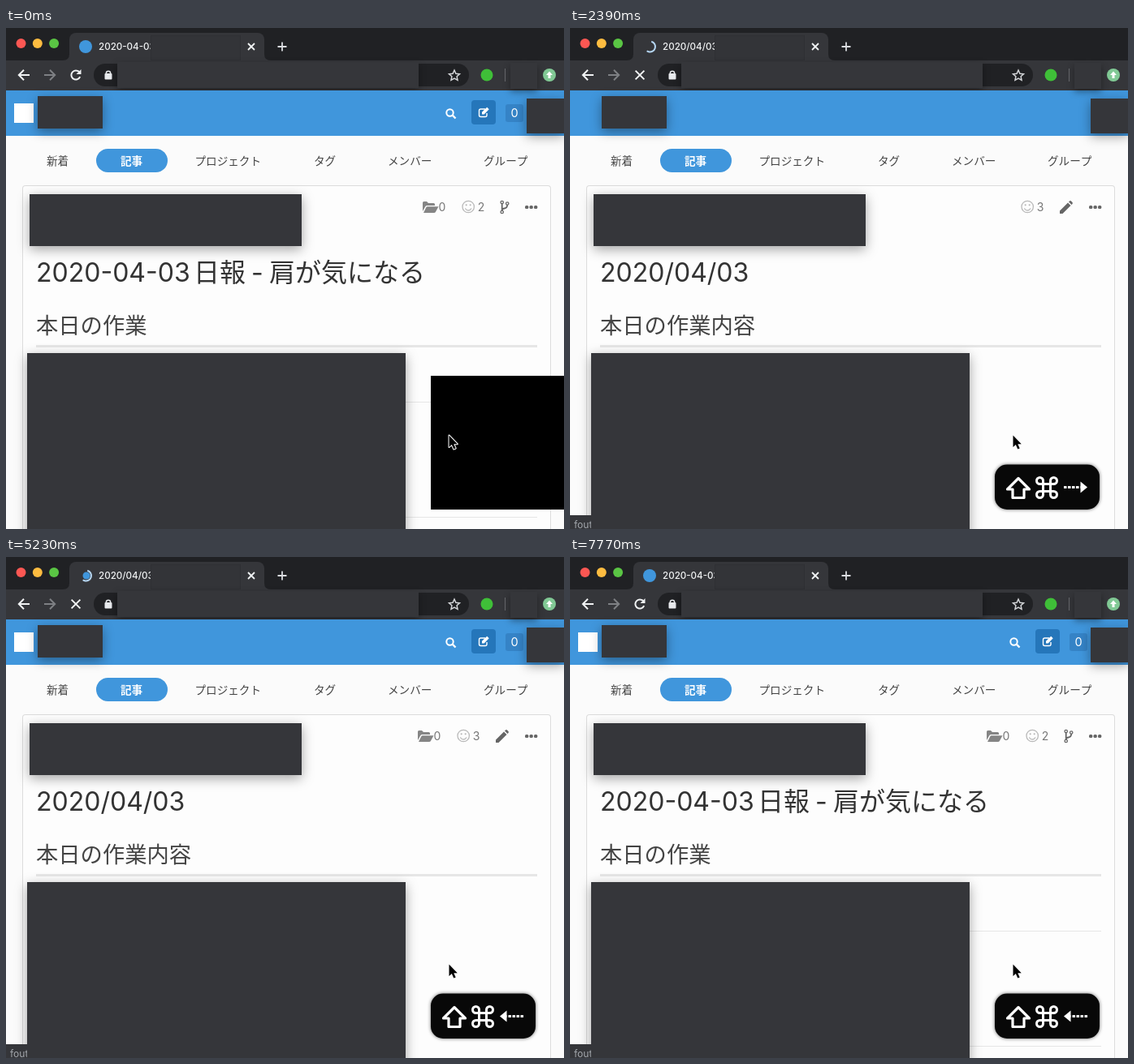
An HTML page with a canvas that plays this animation: 687x618 px, repeating every 8 s.

```html
<!DOCTYPE html>
<html lang="ja">
<head>
<meta charset="utf-8">
<title>日報</title>
<style>
html, body { margin: 0; width: 100%; height: 100%; overflow: hidden; background: #fcfcfc; }
canvas { display: block; }
</style>
</head>
<body>
<canvas id="stage" width="687" height="618"></canvas>
<script>
const ctx = document.getElementById('stage').getContext('2d');
const LOOP = 8000;
const FONT = 'Inter, "Noto Sans CJK JP", "Noto Sans CJK", sans-serif';
const BLUE = '#4096dc', DARK = '#202124', GREY = '#35363a';

const pages = {
  hyphen: { tab: '2020-04-03', title: [[37, '2020-04-03'], [231, '日報'], [302, '-'], [324, '肩が気になる']],
    heading: '本日の作業', likes: 2, shift: 0, rules: [461, 603], tool: 'fork' },
  slash: { tab: '2020/04/03', title: [[37, '2020/04/03'], [225, '日報']],
    heading: '2020/04/03', likes: 1, shift: 2, rules: [461], tool: 'fork' },
  plain: { tab: '2020/04/03', title: [[37, '2020/04/03']],
    heading: '本日の作業内容', likes: 3, shift: -6, rules: [], tool: 'pencil' }
};

// Each visit: request, new page, header ready, spinner off, status fading, status gone
const visits = [
  { at: -9000, shown: -1, ready: -1, done: -1, fade: -1, gone: -1, page: pages.hyphen },
  { at: 150, shown: 450, ready: 600, done: 740, fade: 1340, gone: 1490, page: pages.slash },
  { at: 2090, shown: 2390, ready: 2540, done: 2690, fade: 2980, gone: 3130, page: pages.plain },
  { at: 4930, shown: 5370, ready: 5520, done: 5670, fade: 5820, gone: 5970, page: pages.slash },
  { at: 7320, shown: 7620, ready: 7770, done: 7770, fade: LOOP, gone: LOOP, page: pages.hyphen }
];

// Key overlay: shown, fading, gone, direction
const presses = [[150, 4180, 4330, 1], [4930, 7020, 7170, -1], [7320, LOOP, LOOP, -1]];

const shapes = {
  back: new Path2D('M7 0H-6M0-6.2L-6.2 0L0 6.2'),
  cross: new Path2D('M-4-4L4 4M4-4L-4 4'),
  plus: new Path2D('M-5.5 0H5.5M0-5.5V5.5'),
  up: new Path2D('M0-4.5L4 0H1.5V4H-1.5V0H-4Z'),
  star: new Path2D('M0-6.5L1.9-2.3L6.5-1.8L3.1 1.3L4 5.8L0 3.5L-4 5.8L-3.1 1.3L-6.5-1.8L-1.9-2.3Z'),
  edit: new Path2D('M2-4H-3.5Q-5.5-4-5.5-2V3.5Q-5.5 5.5-3.5 5.5H2Q4 5.5 4 3.5V1'),
  pen: new Path2D('M-2 2.5V-.2L4.2-6.2L6.7-3.7L.7 2.5Z'),
  folder: new Path2D('M0 13V2.5Q0 1 1.5 1H5L7 3H13.5Q15 3 15 4.5V6H5.5Q4 6 3.3 7.3Z' +
    'M1 15L4.3 8.3Q4.8 7.2 6 7.2H19.5L16 13.8Q15.3 15 14 15Z'),
  pencil: new Path2D('M0 12.5L10 2.5L13.5 6L3.5 16H0Z' +
    'M11 1.5L12 .5Q13-.3 14 .5L15.5 2Q16.3 3 15.5 4L14.5 5Z'),
  fork: new Path2D('M0-4V4M6.5-3Q6.5 1 3 1.5Q0 2 0 4'),
  shift: new Path2D('M0-12.5L13.5 1H7V11.5H-7V1H-13.5Z'),
  command: new Path2D('M4.5 8.5V-8.5A4 4 0 1 1 8.5-4.5H-8.5A4 4 0 1 1-4.5-8.5V8.5' +
    'A4 4 0 1 1-8.5 4.5H8.5A4 4 0 1 1 4.5 8.5Z'),
  arrowHead: new Path2D('M14.5 0L6-7V7Z'),
  cursor: new Path2D('M0 0V14.5L3.3 11.5L5.8 17L8.2 16L5.8 10.7H10.3Z')
};

function rect(x, y, w, h, color, r = 0) {
  ctx.fillStyle = color;
  ctx.beginPath();
  ctx.roundRect(x, y, w, h, r);
  ctx.fill();
}

function dot(x, y, r, color) {
  ctx.fillStyle = color;
  ctx.beginPath();
  ctx.arc(x, y, r, 0, Math.PI * 2);
  ctx.fill();
}

function arc(x, y, r, from, to, color, width) {
  ctx.strokeStyle = color;
  ctx.lineWidth = width;
  ctx.beginPath();
  ctx.arc(x, y, r, from, to);
  ctx.stroke();
}

function ring(x, y, r, color, width) {
  arc(x, y, r, 0, Math.PI * 2, color, width);
}

function line(x1, y1, x2, y2, color, width) {
  ctx.strokeStyle = color;
  ctx.lineWidth = width;
  ctx.beginPath();
  ctx.moveTo(x1, y1);
  ctx.lineTo(x2, y2);
  ctx.stroke();
}

function fillAt(shape, x, y, color) {
  ctx.save();
  ctx.translate(x, y);
  ctx.fillStyle = color;
  ctx.fill(shape);
  ctx.restore();
}

function strokeAt(shape, x, y, color, width, flip = 1) {
  ctx.save();
  ctx.translate(x, y);
  ctx.scale(flip, 1);
  ctx.strokeStyle = color;
  ctx.lineWidth = width;
  ctx.stroke(shape);
  ctx.restore();
}

function text(str, x, y, size, color, weight = 400) {
  ctx.font = `${weight} ${size}px ${FONT}`;
  ctx.fillStyle = color;
  ctx.fillText(str, x, y);
}

function cover(x, y, w, h, blur = 14) {
  ctx.save();
  ctx.shadowColor = 'rgba(0,0,0,.36)';
  ctx.shadowBlur = blur;
  ctx.shadowOffsetY = 4;
  rect(x, y, w, h, GREY);
  ctx.restore();
}

function drawTabs(tab, visit, t) {
  rect(0, 0, 687, 41, DARK);
  ['#fc5753', '#fdbc40', '#5ac544'].forEach((c, i) => dot(18.5 + i * 20.3, 19, 6, c));
  rect(78, 6, 240, 40, GREY, 8);
  ctx.fillStyle = GREY;
  ctx.beginPath();
  ctx.moveTo(70, 40);
  ctx.quadraticCurveTo(78, 40, 78, 32);
  ctx.lineTo(318, 32);
  ctx.quadraticCurveTo(318, 40, 326, 40);
  ctx.fill();
  if (t < visit.done) {
    const turn = Math.floor((t - visit.at - 300) / 150);
    if (t < visit.shown || t >= visit.ready) dot(99, 23, 4.5, BLUE);
    arc(98.5, 23, 6.5, turn - 1.3, turn + 2.2, '#b5d6f3', 2);
  } else {
    dot(98, 23, 8, BLUE);
  }
  text(tab, 114, 27, 11.6, '#f1f3f4', 500);
  rect(178, 9, 111, 31, '#2f3034');
  rect(179, 10, 109, 29, '#333438');
  strokeAt(shapes.cross, 302, 23, '#f1f3f4', 1.8);
  strokeAt(shapes.plus, 340, 23, '#dadce0', 1.8);
}

function drawToolbar(loading) {
  rect(0, 40, 687, 37, GREY);
  strokeAt(shapes.back, 22, 58, '#f1f3f4', 2);
  strokeAt(shapes.back, 54, 58, '#7e8084', 2, -1);
  if (loading) {
    ctx.save();
    ctx.translate(86, 58);
    ctx.scale(1.35, 1.35);
    strokeAt(shapes.cross, 0, 0, '#f1f3f4', 1.5);
    ctx.restore();
  } else {
    arc(86, 58, 5.6, 0.4, 5.5, '#f1f3f4', 2);
    fillAt(new Path2D('M0 0V-6L-6 0Z'), 92.5, 57, '#f1f3f4');
  }
  rect(108, 44, 462, 28, DARK, 14);
  rect(121.5, 56, 9, 7.5, '#e8eaed', 1);
  arc(126, 56, 2.7, Math.PI, Math.PI * 2, '#e8eaed', 1.5);
  cover(137, 42, 371, 32, 10);
  strokeAt(shapes.star, 552, 58.5, '#d5d7da', 1.5);
  dot(592, 58, 7.5, '#3fbf38');
  rect(614, 50, 1, 16, '#66686c');
  dot(669, 58, 8, '#81c995');
  fillAt(shapes.up, 669, 58, '#fff');
}

function drawHeader(ready) {
  rect(0, 77, 687, 56, BLUE);
  if (ready) {
    rect(10, 93, 24, 24, '#fff');
    ring(546.5, 104.5, 4.2, '#fff', 2);
    line(549.7, 107.7, 553.5, 111.5, '#fff', 2.4);
    rect(573, 89, 30, 30, '#2576ba', 4);
    strokeAt(shapes.edit, 588, 104, '#fff', 1.4);
    fillAt(shapes.pen, 588, 104, '#fff');
    rect(615, 94, 22, 22, '#3583c6', 3);
    text('0', 621.5, 110.2, 14.5, '#fff');
  }
  cover(39, 84, 80, 40);
  cover(641, 87, 46, 43);
  cover(621, 43, 33, 32, 8);
}

function drawNav() {
  rect(111, 149, 88, 29, BLUE, 14.5);
  text('記事', 141, 168.5, 13.6, '#fff', 700);
  [['新着', 50], ['プロジェクト', 232.5], ['タグ', 379], ['メンバー', 470], ['グループ', 588]]
    .forEach(([label, x]) => text(label, x, 168.5, 13.6, '#444', 500));
}

function drawTools(page, ready) {
  const x = page.shift;
  if (ready) {
    fillAt(shapes.folder, 513 + x, 213, '#858585');
    text('0', 532.5 + x, 226, 14, '#777');
  }
  ring(569.2 + x, 220.5, 7.2, '#b9b9b9', 1.3);
  dot(566.7 + x, 218.3, 1.1, '#b9b9b9');
  dot(571.7 + x, 218.3, 1.1, '#b9b9b9');
  arc(569.2 + x, 221, 4, 0.35, Math.PI - 0.35, '#b9b9b9', 1.3);
  text(String(page.likes), 580.8 + x, 226, 14, '#777');
  if (page.tool === 'pencil') {
    fillAt(shapes.pencil, 603, 213, '#666');
  } else {
    strokeAt(shapes.fork, 610.7, 221, '#666', 1.8);
    [[610.7, 215], [610.7, 227], [617.2, 216.5]].forEach(([cx, cy]) => ring(cx, cy, 1.7, '#666', 1.3));
  }
  for (let i = 0; i < 3; i++) rect(639 + i * 5.5, 219, 4.3, 4, '#666', 1.5);
}

function drawArticle(page, ready) {
  rect(0, 133, 687, 485, '#fbfbfb');
  drawNav();
  rect(20, 194, 651, 440, '#dcdcdc', 4);
  rect(21, 195, 649, 440, '#fdfdfd', 3);
  drawTools(page, ready);
  page.title.forEach(([x, str]) => text(str, x, 313, 32, '#333'));
  text(page.heading, 37, 377, 27.3, '#444');
  rect(37, 391, 617, 3, '#e6e6e6');
  page.rules.forEach(y => rect(480, y, 174, 1, '#e6e6e6'));
  cover(29, 205, 335, 64);
  cover(26, 401, 466, 240);
}

function drawStatus(alpha) {
  ctx.save();
  ctx.globalAlpha = alpha;
  ctx.beginPath();
  ctx.rect(0, 600, 26, 18);
  ctx.clip();
  rect(-4, 601, 40, 30, GREY, 3);
  text('fout', 5, 617, 12, '#a3a7ac');
  ctx.restore();
}

function drawKeys(dir, faded) {
  const ink = faded ? '#9a9a9a' : '#fff';
  ctx.save();
  ctx.shadowColor = faded ? 'rgba(0,0,0,.2)' : 'rgba(0,0,0,.6)';
  ctx.shadowBlur = 4;
  rect(523, 538.5, 129, 55.5, faded ? '#999' : '#080808', 15);
  ctx.shadowColor = faded ? 'rgba(0,0,0,.45)' : 'transparent';
  ctx.lineJoin = 'round';
  strokeAt(shapes.shift, 552, 568, ink, 3.2);
  strokeAt(shapes.command, 587, 567, ink, 3);
  ctx.translate(622.5, 566.5);
  ctx.scale(dir, 1);
  fillAt(shapes.arrowHead, 0, 0, ink);
  ctx.setLineDash([3.5, 1.5]);
  line(-14.5, 0, 6, 0, ink, 3);
  ctx.restore();
}

function drawCursor() {
  ctx.save();
  ctx.lineJoin = 'round';
  strokeAt(shapes.cursor, 545.5, 502.5, '#fff', 2);
  fillAt(shapes.cursor, 545.5, 502.5, '#000');
  ctx.restore();
}

function draw(t) {
  const n = visits.findLastIndex(v => t >= v.at);
  const visit = visits[n];
  const page = t >= visit.shown ? visit.page : visits[n - 1].page;
  const ready = t < visit.shown || t >= visit.ready;

  drawArticle(page, ready);
  drawTabs(page.tab, visit, t);
  drawToolbar(t < visit.done);
  drawHeader(ready);

  if (t >= visit.at + 150 && t < visit.gone) drawStatus(t < visit.fade ? 1 : 0.5);
  if (t < 150) rect(523, 429, 164, 165, '#000');
  const press = presses.find(([from, , to]) => t >= from && t < to);
  if (press) drawKeys(press[3], t >= press[1]);
  drawCursor();
}

function tick() {
  draw(performance.now() % LOOP);
  requestAnimationFrame(tick);
}
tick();
</script>
</body>
</html>
```
